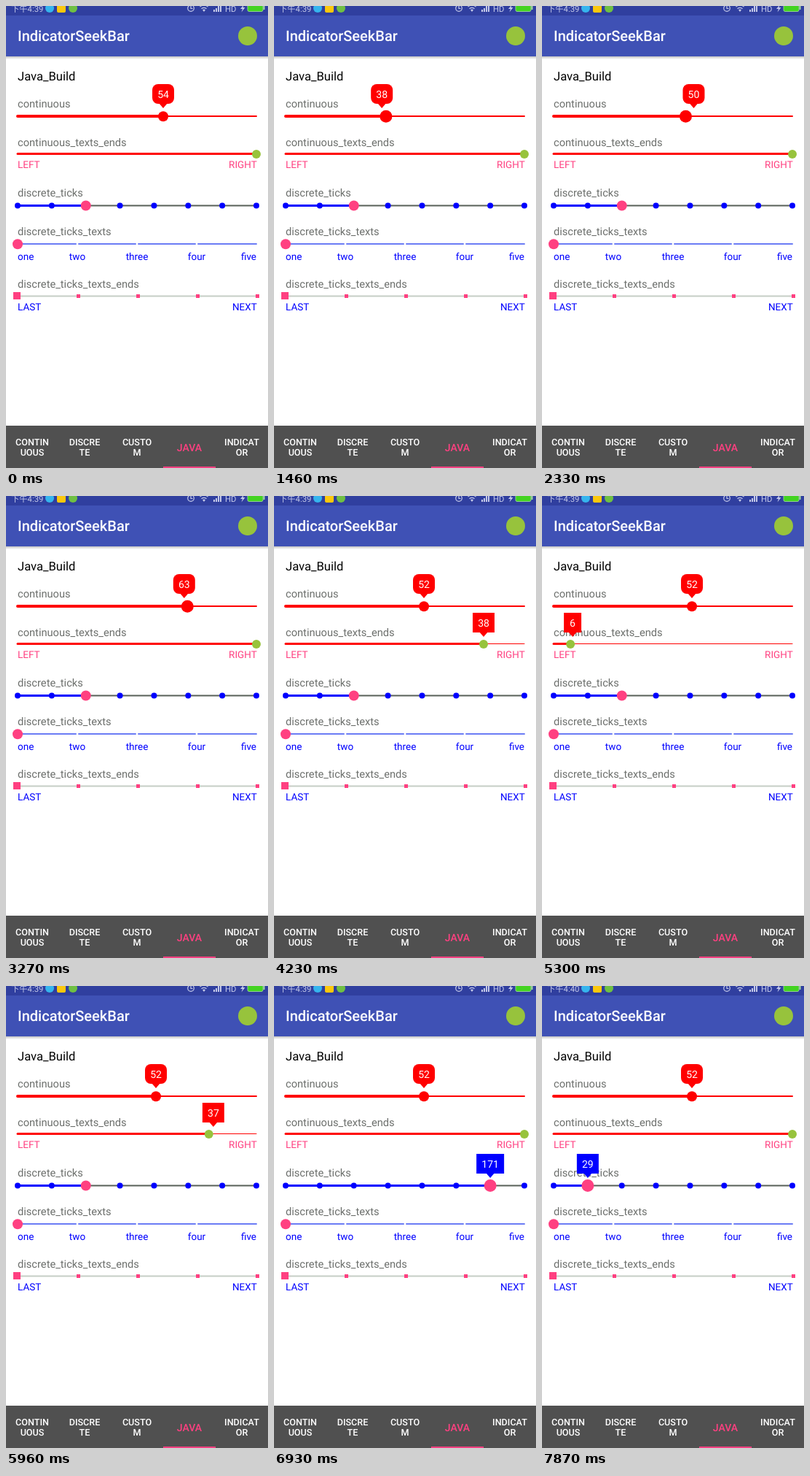
An HTML page that plays this animation: 360 px wide and 633 px high, repeating every 8 s.

```html
<!DOCTYPE html>
<html lang="en">
<head>
<meta charset="utf-8">
<title>IndicatorSeekBar</title>
<style>
  html, body { margin: 0; width: 100%; height: 100%; overflow: hidden; background: #fff; }
  svg { display: block; width: 360px; height: 633px; }
  text { font: 14.65px Roboto, sans-serif; text-rendering: geometricPrecision; }
  .label { fill: #6c6f6c; }
  .head { font-size: 16.6px; }
  .small { font-size: 13.5px; }
  .pink { fill: #ff4081; }
  .blue { fill: #00f; }
  .end { text-anchor: end; }
  .mid { text-anchor: middle; }
  .title { font-size: 20px; font-weight: 500; fill: #fff; }
  .tab { font-size: 12.6px; font-weight: 500; fill: #fff; text-anchor: middle; }
  .active { font-size: 14px; fill: #ff4081; }
  .status { font: 11.3px Roboto, "Noto Sans CJK SC", "Noto Sans CJK", sans-serif; fill: #c5cae9; }
  .tip text { font-size: 14px; fill: #fff; text-anchor: middle; }
</style>
</head>
<body>
<svg viewBox="0 0 360 633">
  <defs>
    <linearGradient id="shade" x2="0" y2="1">
      <stop stop-color="#000" stop-opacity=".24"/>
      <stop offset="1" stop-color="#000" stop-opacity="0"/>
    </linearGradient>
  </defs>
  <rect width="360" height="633" fill="#fff"/>
  <rect y="69" width="360" height="4" fill="url(#shade)"/>
  <rect width="360" height="69" fill="#3f51b5"/>
  <rect width="360" height="13" fill="#303f9f"/>

  <text id="clock" class="status" x="7" y="8"></text>
  <circle cx="60" cy="3" r="6" fill="#35b5ee"/>
  <rect x="70" y="-3" width="12" height="12" rx="2" fill="#fcc80c"/>
  <circle cx="92" cy="3" r="6" fill="#6fc043"/>
  <g fill="none" stroke="#c5cae9" stroke-width="1.2">
    <circle cx="254" cy="3" r="4.3"/>
    <path d="M254 0V3.5H256.5M266.5 1Q272-3 277.5 1M268.5 3.7Q272 1 275.5 3.7"/>
  </g>
  <path d="M270 5.2Q272 4 274 5.2L272 8ZM285 5h2v3h-2zM288 3h2v5h-2zM291 0h2v8h-2zM294-3h2v11h-2zM327-2L322 4H325L323.5 8.5L328.5 2H325.5Z" fill="#c5cae9"/>
  <text class="status" x="301" y="7.5">HD</text>
  <rect x="332" y="-3" width="21" height="10.5" rx="2" fill="#43d321" stroke="#a8dfa0" stroke-width=".8"/>
  <rect x="353.5" width="2" height="5" fill="#a8dfa0"/>

  <text class="title" x="16" y="48">IndicatorSeekBar</text>
  <circle cx="332" cy="41" r="13" fill="#97c33c"/>
  <text class="head" x="16" y="102">Java_Build</text>
  <g id="body"></g>
  <g id="nav"><rect y="575" width="360" height="58" fill="#505050"/></g>
</svg>
<script>
const LOOP = 8000, STEP = 96, LAG = 18, LEFT = 16, SPAN = 328;
const RED = "#f00", BLUE = "#00f", PINK = "#ff4081";
const $ = id => document.getElementById(id);
const body = $("body"), nav = $("nav");

function set(el, attrs) {
  for (const k in attrs) el.setAttribute(k, attrs[k]);
}
function add(parent, tag, attrs, text = "") {
  const el = document.createElementNS("http://www.w3.org/2000/svg", tag);
  set(el, attrs);
  el.textContent = text;
  parent.appendChild(el);
  return el;
}

const write = (x, y, cls, s) => add(body, "text", { x, y, class: cls }, s);
const label = (y, s) => write(LEFT, y, "label", s);
const line = (y, width, stroke) => add(body, "line",
  { x1: LEFT, x2: LEFT + SPAN, y1: y, y2: y, stroke, "stroke-width": width, "stroke-linecap": "round" });
const dot = (cx, cy, r, fill) => add(body, "circle", { cx, cy, r, fill });
const square = (cx, cy, s, fill) =>
  add(body, "rect", { x: cx - s / 2, y: cy - s / 2, width: s, height: s, fill });
const tickX = (i, parts) => LEFT + SPAN * i / parts;
function ends(y, color, left, right) {
  write(LEFT, y, "small " + color, left);
  write(LEFT + SPAN + 0.8, y, "small end " + color, right);
}

label(139, "continuous");
line(151, 2, RED);
const fill1 = line(151, 4, RED), thumb1 = dot(0, 151.3, 7, RED);

label(192, "continuous_texts_ends");
line(202.5, 1, RED);
const fill2 = line(202.5, 3, RED), thumb2 = dot(0, 203, 6, "#97c33c");
ends(222, "pink", "LEFT", "RIGHT");

label(261, "discrete_ticks");
line(273.5, 2, "#586058");
const fill3 = line(273.5, 3, BLUE);
for (let i = 0; i < 8; i++) dot(tickX(i, 7), 273.5, 4, BLUE);
const thumb3 = dot(0, 273.5, 7, PINK);

label(314, "discrete_ticks_texts");
line(326, 2, "#6b7cf5");
["one", "two", "three", "four", "five"].forEach((s, i) => {
  const x = tickX(i, 4), side = ["", "mid", "mid", "mid", "end"][i];
  if (side === "mid") square(x, 326, 2.5, "#fff");
  write(x, 348, "small blue " + side, s);
});
dot(LEFT, 326.2, 7, PINK);

label(386, "discrete_ticks_texts_ends");
line(397.5, 2, "#c6cec6");
for (let i = 1; i < 5; i++) square(tickX(i, 4) + 1.5, 397.5, 5, PINK);
square(15, 397, 10, PINK);
ends(417, "blue", "LAST", "NEXT");

["CONTIN UOUS", "DISCRE TE", "CUSTO M", "JAVA", "INDICAT OR"].forEach((s, i) => {
  const x = 36 + 72 * i, rows = s.split(" ");
  if (rows.length > 1) {
    rows.forEach((row, n) => add(nav, "text", { x, y: 602 + 14 * n, class: "tab" }, row));
  } else {
    add(nav, "text", { x, y: 609.5, class: "tab active" }, s);
    add(nav, "rect", { x: x - 36, y: 631, width: 72, height: 2, fill: PINK });
  }
});

// value bubble; returns its update function
function bubble(top, fill, rx) {
  const g = add(body, "g", { class: "tip" });
  const box = add(g, "rect", { y: top, height: 27, rx, fill });
  add(g, "path", { d: `M-6 ${top + 26}H6L0 ${top + 33}Z`, fill });
  const text = add(g, "text", { y: top + 19 });
  return (x, value, opacity = 1) => {
    const half = Math.round(8 + 3.6 * String(value).length);
    set(g, { transform: `translate(${x})`, opacity });
    set(box, { x: -half, width: 2 * half });
    text.textContent = value;
  };
}
const tip1 = bubble(107, RED, 8), tip2 = bubble(160, RED, 0), tip3 = bubble(230, BLUE, 0);

// turning points of the finger: time, x
const drag1 = [[500, 216], [590, 219], [1090, 219], [1930, 45], [2640, 324], [2850, 324], [3560, 206]];
const drag2 = [[3780, 344], [3860, 288], [4250, 288], [5120, 29], [5150, 29], [6300, 344]];

const clamp = v => Math.max(0, Math.min(1, v));
const ease = u => (1 - Math.cos(Math.PI * clamp(u))) / 2;
function along(path, t) {
  let x = path[0][1];
  for (let i = 1; i < path.length; i++) {
    const [t0, x0] = path[i - 1], [t1, x1] = path[i];
    x += (x1 - x0) * ease((t - t0) / (t1 - t0));
  }
  return x;
}
const valueAt = (x, range) => Math.round(2.9 + range * (x - LEFT) / SPAN);

function draw(time) {
  const t = time - time % STEP + 20; // the screen refreshes in steps

  // the thumb trails its bubble slightly
  const x1 = along(drag1, t - LAG);
  set(fill1, { x2: x1 });
  set(thumb1, { cx: x1, r: t > 590 && t < 3570 ? 8.5 : 7 });
  tip1(along(drag1, t), valueAt(x1, 84.3));

  const x2 = along(drag2, t - LAG);
  set(fill2, { x2 });
  set(thumb2, { cx: x2 });
  tip2(along(drag2, t), valueAt(x2, 42.3), t < 6550 ? clamp((t - 3950) / 200) : 0);

  const pressed = t > 6740;
  const tick = pressed ? 6 - Math.max(0, Math.min(5, Math.ceil((t - 7110) / 165))) : 2;
  const x3 = tickX(tick, 7);
  set(fill3, { x2: x3 });
  set(thumb3, { cx: x3, r: pressed ? 8.5 : 7 });
  tip3(x3, Math.round(200 * tick / 7), clamp((t - 6740) / 190));

  $("clock").textContent = t > 7200 ? "下午4:40" : "下午4:39";
}

const start = performance.now();
function loop() {
  draw((performance.now() - start) % LOOP);
  requestAnimationFrame(loop);
}
loop();
</script>
</body>
</html>
```
